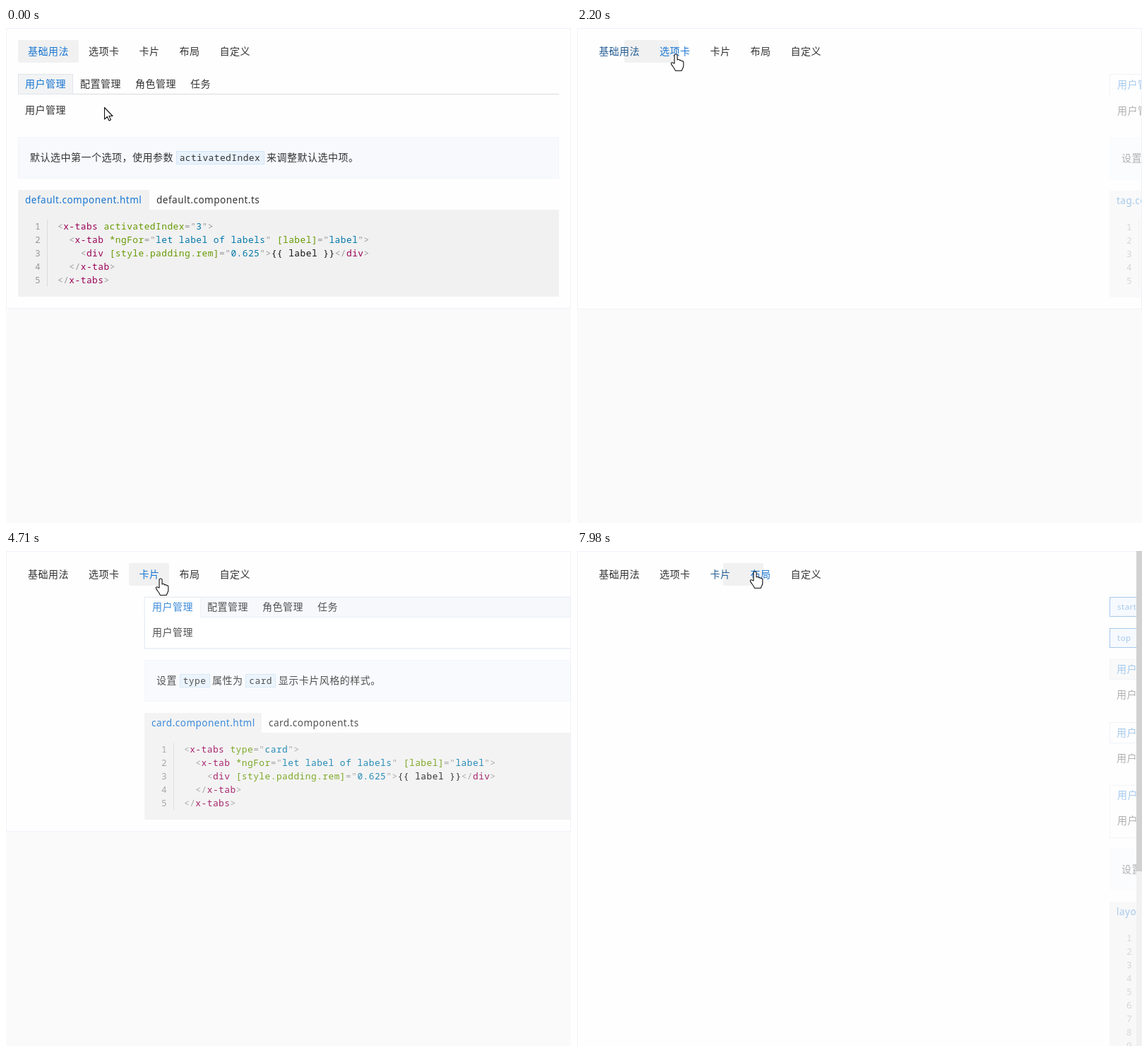
Write an HTML page that moves like this. It is 800 by 700 pixels and loops after 8000 ms.

```html
<!DOCTYPE html>
<html lang="zh-CN">
<head>
<meta charset="utf-8">
<style>
html, body { margin: 0; width: 100%; height: 100%; overflow: hidden; background: #fafafa; }
svg { display: block; width: 800px; height: 700px; }
text { white-space: pre; letter-spacing: .5px; fill: #333; }
.cjk { font: 14px "Noto Sans CJK SC", "Noto Sans CJK", sans-serif; }
.file { font: 13.5px "Noto Sans", sans-serif; }
.small { font: 11.5px "Noto Sans", sans-serif; }
.mono { font: 12.8px "Noto Sans Mono", monospace; }
</style>
</head>
<body>
<svg id="stage" viewBox="0 0 800 700"></svg>
<script>
const LOOP = 8000, TICK = 156, WIDTH = 766, RATE = .371;
const BLUE = '#1976d2', MID = '#255d94', DARK = '#333', GREY = '#f1f1f1';
const stage = document.getElementById('stage');
const labels = ['用户管理', '配置管理', '角色管理', '任务'];
const menu = [['基础用法', 17, 86], ['选项卡', 103, 71], ['卡片', 174, 57], ['布局', 231, 57], ['自定义', 288, 71]];

// start: tick at which the page opens; clicks: [tick, tab]
const pages = [
  { start: -9, name: 'default', fileW: 186, dy: 0, attr: 'activatedIndex', value: '3',
    tip: ['默认选中第一个选项，使用参数', 'activatedIndex', '来调整默认选中项。'],
    clicks: [[2.1, 1], [5.11, 2], [8.1, 3]] },
  { start: 13, name: 'tag', fileW: 159, dy: 1, attr: 'type', value: 'tag',
    tip: ['设置', 'type', '属性为', 'tag', '显示卡片风格的样式。'],
    clicks: [[18.1, 1], [20.1, 2], [23.1, 3]] },
  { start: 28, name: 'card', fileW: 166, dy: 0, attr: 'type', value: 'card',
    tip: ['设置', 'type', '属性为', 'card', '显示卡片风格的样式。'],
    clicks: [[32.1, 1], [37.1, 2], [41.31, 0]] },
  { start: 50, name: 'layout' }
];

// pointer path: tick, x, y
const path = [[-1, 139, 112], [0, 139, 105], [1, 136, 97], [2, 134, 82], [4, 136, 82], [5, 212, 84],
  [6, 215, 84], [7, 286, 84], [9, 286, 82], [11, 150, 36], [12, 140, 36], [14, 140, 37], [17, 132, 60],
  [18, 127, 73], [19, 127, 73], [20, 205, 76], [22, 215, 76], [23, 280, 76], [24, 280, 76], [27, 219, 39],
  [29, 219, 39], [31, 140, 76], [33, 140, 78], [35, 219, 79], [38, 219, 79], [40, 80, 80], [41, 60, 80],
  [42, 100, 76], [43, 186, 67], [45, 252, 32], [50, 252, 29]];

const clamp = v => Math.max(0, Math.min(1, v));
const mix = (a, b, p) => a + (b - a) * p;
const slide = p => Math.round(WIDTH * (1 - clamp(p)) ** 3);
const fade = p => clamp(.37 + 1.25 * p);
const esc = s => s.replace(/&/g, '&amp;').replace(/</g, '&lt;').replace(/>/g, '&gt;');
const text = (x, y, s, cls = 'cjk', fill = DARK) =>
  `<text x="${x}" y="${y}" class="${cls}" style="fill:${fill}">${esc(s)}</text>`;
const rect = (x, y, w, h, fill) => `<rect x="${x}" y="${y}" width="${w}" height="${h}" fill="${fill}"/>`;
const box = (x, y, w, h, fill, line) => rect(x, y, w, h, line) + rect(x + 1, y + 1, w - 2, h - 2, fill);
const move = (x, y, opacity, body) => `<g transform="translate(${x} ${y})" opacity="${opacity}">${body}</g>`;

function pointer(tick) {
  const i = path.findIndex(k => k[0] >= tick);
  if (i < 1) return path[i < 0 ? path.length - 1 : 0].slice(1);
  const [a, b] = [path[i - 1], path[i]], p = (tick - a[0]) / (b[0] - a[0]);
  return [mix(a[1], b[1], p), mix(a[2], b[2], p)].map(Math.round);
}

function drawPointer([x, y]) {
  const hand = (y > 17 && y < 50) || (y > 64 && y < 94);
  const shape = hand
    ? 'M-2 13V2a2 2 0 0 1 4 0v6c1-1 3.5-.5 3.5 1c1-.8 3-.3 3 1c1-.6 2.3 0 2.3 1.5v5c0 3-2 4-2.5 7h-9c-.5-3-4.5-6.5-5.8-9.5c-.8-2 1.5-3 2.7-1.5z'
    : 'M.5.5V17l3.8-3.6 2.7 5.6 2.5-1.2-2.6-5.3H12z';
  return move(x, y, 1, `<path d="${shape}" fill="#fff" stroke="#111" stroke-width="1.1" stroke-linejoin="round"/>`);
}

const colors = { p: '#999', t: '#905', a: '#690', v: '#07a', k: '#111' };
const paint = line => line.split('|').map(s => `<tspan fill="${colors[s[0]]}">${esc(s.slice(1))}</tspan>`).join('');

function code(page) {
  const lines = [
    `p<|tx-tabs|a ${page.attr}|p="|v${page.value}|p">`,
    'p  <|tx-tab|a *ngFor|p="|vlet label of labels|p"|a [label]|p="|vlabel|p">',
    'p    <|tdiv|a [style.padding.rem]|p="|v0.625|p">|k{{ label }}|p</|tdiv|p>',
    'p  </|tx-tab|p>',
    'p</|tx-tabs|p>'
  ];
  return rect(17, 257, WIDTH, 123, GREY) + rect(58, 271, 1, 95, '#dcdcdc') + lines.map((line, i) =>
    text(41, 285 + 19 * i, String(i + 1), 'mono', '#999') +
    `<text x="73" y="${285 + 19 * i}" class="mono">${paint(line)}</text>`).join('');
}

function tip(parts) {
  let x = 34, out = box(17, 154, WIDTH, 59, '#f7f9fd', '#f2f5fb');
  parts.forEach((s, i) => {
    if (i % 2) {
      const w = s.length * 8.18 + 10;
      x += 3.7;
      out += box(Math.round(x), 174, Math.round(w), 19, '#e8f2fc', '#d3e5f7') + text(x + 5, 188, s, 'mono');
      x += w + 3.7;
    } else {
      out += text(x, 188, s);
      x += s.length * 14.5;
    }
  });
  return out;
}

function files({ name, fileW }) {
  return rect(17, 229, fileW, 28, GREY) + text(27, 248, name + '.component.html', 'file', BLUE) +
    text(27 + fileW, 248, name + '.component.ts', 'file');
}

function tabs(page, tick) {
  const past = page.clicks.filter(c => Math.floor(c[0]) <= tick);
  const last = past[past.length - 1];
  const before = past.length > 1 ? past[past.length - 2][1] : 0;
  const chosen = last ? last[1] : 0;
  const p = last ? RATE * (tick - last[0]) : 1;
  const tag = page.name === 'tag', card = page.name === 'card';
  const pitch = tag ? 79 : 78, x0 = tag || card ? 28 : 27, base = tag ? 85 : 84;
  const left = i => 17 + pitch * i;
  const wide = i => i === 3 ? 49 : 78;
  const over = t => {
    const [x, y] = pointer(t);
    return y > 70 && y < 94 ? Math.floor((x - 17) / pitch) : -1;
  };
  let out = '';

  if (tag) {
    out += rect(17, 94, WIDTH, 1, '#dadfea');
    labels.forEach((_, i) => out += box(left(i), 65, wide(i) + 2, 30, '#fff', '#dadfea'));
    out += rect(left(chosen) + 1, 94, wide(chosen), 1, '#fff');
  } else if (card) {
    out += box(16, 64, 768, 75, '#e6ebf3', '#f3f5f9') + rect(18, 66, 764, 71, '#fff') +
      rect(18, 66, 764, 28, '#e9eef6') + rect(18, 66, 764, 27, '#f5f7fc');
    out += rect(left(chosen), 66, wide(chosen) + 2, 28, '#e9eef6') +
      rect(left(chosen) + 1, 66, wide(chosen), 28, '#fff');
  } else {
    out += rect(17, 93, WIDTH, 1, '#d9dade') + box(left(chosen), 65, wide(chosen), 29, '#f2f3f4', '#e1e5ea');
  }

  const lit = p < 0 ? before : chosen;
  labels.forEach((s, i) => {
    const hover = over(tick) === i ? (over(tick - 1) === i ? BLUE : MID) : DARK;
    out += text(x0 + pitch * i, base, s, 'cjk', i === lit ? BLUE : hover);
  });
  if (p >= 0) {
    const dx = slide(p) * (chosen < before ? -1 : 1);
    const y = card ? 120 : 121 + page.dy;
    out += `<g clip-path="url(#body)">${move(dx, 0, fade(p), text(x0, y, labels[chosen]))}</g>`;
  }
  return out;
}

function layout() {
  let out = '';
  ['start', 'top'].forEach((s, i) => {
    out += box(17, 65 + 44 * i, 60, 28, '#eaf3fc', BLUE) + text(28, 83 + 44 * i, s, 'small', BLUE);
  });
  out += box(17, 153, 78, 29, '#f2f3f4', '#e1e5ea') + box(17, 242, 80, 30, '#fff', '#dadfea') +
    box(17, 331, 758, 75, '#fff', '#dfe5ef');
  [[27, 172, 208], [27, 262, 298], [28, 350, 386]].forEach(([x, a, b]) => {
    out += text(x, a, labels[0], 'cjk', BLUE) + text(x, b, labels[0]);
  });
  out += rect(17, 420, 758, 60, '#f7f9fd') + text(34, 455, '设置') +
    rect(17, 496, 170, 29, GREY) + text(27, 515, 'layout.component.html', 'file', BLUE) +
    rect(17, 525, 758, 175, GREY);
  for (let i = 0; i < 9; i++) out += text(41, 552 + 19 * i, String(i + 1), 'mono', '#999');
  return out;
}

function draw(tick) {
  let cur = 0;
  pages.forEach((page, i) => { if (tick >= page.start) cur = i; });
  const page = pages[cur], tall = page.name === 'layout';
  const p = RATE * (tick - page.start) + .013;
  const opening = cur > 0 && tick === page.start;
  const edge = tall ? 792 : 799;

  let out = `<defs><clipPath id="body"><rect x="17" y="96" width="766" height="50"/></clipPath>
    <clipPath id="panel"><rect width="${edge}" height="700"/></clipPath></defs>`;
  out += box(0, 0, tall ? 810 : 800, tall ? 710 : 397 + page.dy, '#fefefe', '#f0f2fb');

  const [, toX, toW] = menu[cur], [, fromX, fromW] = menu[Math.max(0, cur - 1)];
  const ink = clamp(.56 + 1.5 * p);
  out += `<rect x="${Math.round(mix(fromX, toX, ink))}" y="17" width="${Math.round(mix(fromW, toW, ink))}" height="32" rx="2" fill="${GREY}"/>`;
  const [mx, my] = pointer(tick);
  menu.forEach(([s, x, w], i) => {
    const hover = my > 17 && my < 49 && mx >= x && mx < x + w;
    const fill = i === cur || hover ? BLUE : opening && i === cur - 1 ? MID : DARK;
    out += text(x + 14 + (i > 1 ? .5 : 0), 38, s, 'cjk', fill);
  });

  const body = tall ? layout()
    : tabs(page, tick) + move(0, page.dy, 1, tip(page.tip) + files(page) + code(page));
  out += `<g clip-path="url(#panel)">${move(slide(p), 0, fade(p), body)}</g>`;
  if (tall) out += rect(792, 0, 8, 700, '#f1f1f1') + rect(792, 0, 8, 453, '#d1d1d1');
  stage.innerHTML = out + drawPointer([mx, my]);
}

let shown;
function frame() {
  const t = performance.now() % LOOP;
  const tick = Math.max(-1, Math.floor((t - 166) / TICK));
  if (tick !== shown) draw(shown = tick);
  requestAnimationFrame(frame);
}
frame();
</script>
</body>
</html>
```
